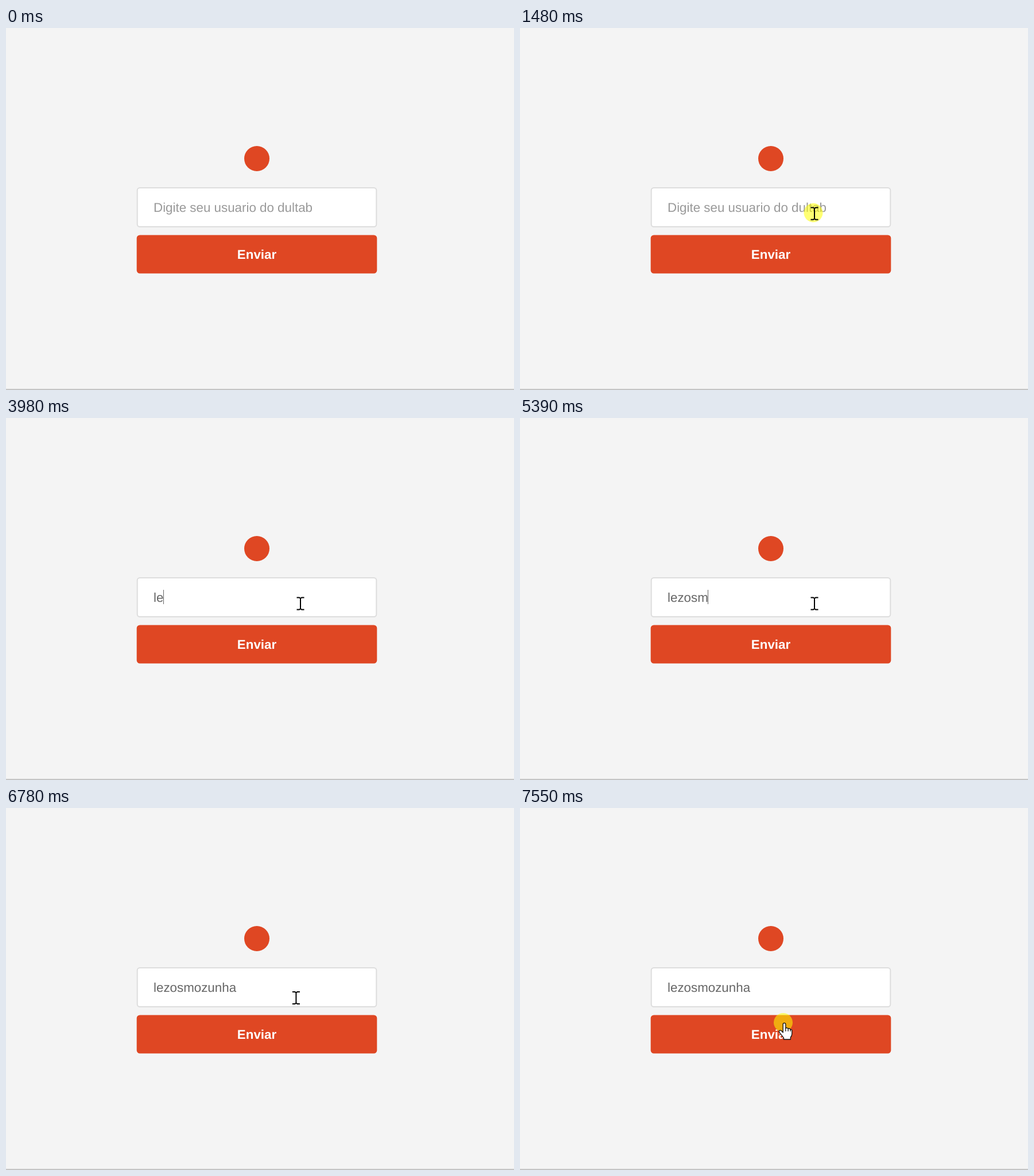
An HTML page for the animation above (8 s loop, 885 px wide and 632 px high).

```html
<!DOCTYPE html>
<html lang="pt">
<head>
<meta charset="utf-8">
<title>Login</title>
<style>
  html, body { margin: 0; width: 100%; height: 100%; overflow: hidden; background: #f4f4f4; }
  svg { display: block; width: 100%; height: 100%; }
  text { font: 22.35px "Liberation Sans", Arial, sans-serif; text-rendering: geometricPrecision; }
  .button-label { font-weight: bold; text-anchor: middle; fill: #fff; }
  .shape { fill: #fff; stroke: #111; stroke-width: 1.3; stroke-linejoin: round; }
</style>
</head>
<body>
<svg viewBox="0 0 885 632">
  <rect width="885" height="632" fill="#f4f4f4"/>
  <rect y="630" width="885" height="2" fill="#c4c4c4"/>
  <circle cx="437" cy="228" r="22" fill="#df4723"/>

  <rect x="228.7" y="279" width="416.6" height="68" rx="4.5" fill="#fff" stroke="#ddd" stroke-width="2"/>
  <text id="placeholder" x="257" y="321" fill="#999">Digite seu usuario do dultab</text>
  <text id="typed" x="257" y="321" fill="#666"></text>
  <rect id="caret" y="300" width="1" height="25" fill="#666"/>

  <rect x="227.7" y="361.5" width="418.6" height="67" rx="5.5" fill="#df4723"/>
  <text class="button-label" x="437" y="403">Enviar</text>

  <g id="pointer">
    <circle id="click" cx="-2" cy="-1.5" r="16.5" fill="#ff0" fill-opacity=".55"/>
    <path id="arrow" class="shape" d="M0 0V23.5L5.5 18.5L9.3 27L13 25.4L9.3 17H17Z"/>
    <path id="beam" fill="none" stroke="#000" stroke-width="2"
      d="M-6.5 -10.5H-2L0 -9L2 -10.5H6.5M0 -9.5V9.5M-6.5 10.5H-2L0 9L2 10.5H6.5"/>
    <g id="hand" class="shape">
      <path d="M-2.3 1.6Q-2.3 -.6 0 -.6Q2.3 -.6 2.3 1.6V8.6Q3 7.5 4.6 7.8Q6.4 8 6.6 9.6
        Q7.2 8.6 8.8 9Q10.4 9.4 10.6 11Q11.3 10.2 12.4 10.8Q13.3 11.3 13.3 13V18
        Q13.3 21.5 10.8 24.5V28H-1V25.5Q-5 20 -8.7 15.6Q-9.8 13.6 -8.2 12.4Q-6 11.6 -4 14L-2.3 16Z"/>
      <path fill="none" d="M2.3 8.5V14M6.6 9.6V14M10.6 11V14"/>
    </g>
  </g>
</svg>
<script>
const LOOP = 8000;
const USER = "lezosmozunha";
const BLINK = 550;
const FRAME = 76;
const ENTER = 480, FIELD_CLICK = 1480, FOCUS = 1840, LEAVE = 6780, BUTTON_CLICK = 7390;
const CLICK_LENGTH = 165;
const FIELD = [513, 324], BUTTON = [460.5, 376];

const $ = id => document.getElementById(id);
const show = (id, visible) => $(id).setAttribute("visibility", visible ? "inherit" : "hidden");
const mix = (from, to, amount) => from + (to - from) * amount;

// Keys come in quick pairs: every second one is half a beat early
const burst = (start, count, beat) =>
  Array.from({ length: count }, (_, i) => start + beat * (i - (i % 2) / 2));
const keyTimes = [...burst(3910, 5, 117), ...burst(5390, 7, 140)];

function pointerAt(t) {
  if (t < ENTER) return null;
  if (t < LEAVE) {
    const left = 1 - Math.min(Math.floor((t - ENTER) / FRAME) / 10, 1);
    return [mix(FIELD[0], 684, left ** 4), mix(FIELD[1], 555, left ** 2.85)];
  }
  const done = Math.min((Math.floor((t - LEAVE) / FRAME) + 1) / 5, 1) ** 1.2;
  return FIELD.map((value, axis) => mix(value, BUTTON[axis], done));
}

function shapeAt(x, y) {
  if (x < 228 || x > 646) return "arrow";
  if (y >= 278 && y <= 348) return "beam";
  return y >= 361 && y <= 428 ? "hand" : "arrow";
}

function drawField(t) {
  const pressed = keyTimes.filter(time => t >= time);
  $("typed").textContent = USER.slice(0, pressed.length);
  show("placeholder", !pressed.length);

  // Each key restarts the caret's blinking
  const sinceInput = t - (pressed.at(-1) ?? FIELD_CLICK);
  const focused = t >= FOCUS && t < BUTTON_CLICK;
  show("caret", focused && Math.floor(sinceInput / BLINK) % 2 === 0);
  const width = pressed.length ? $("typed").getComputedTextLength() : 0;
  $("caret").setAttribute("x", Math.floor(257 + width));
}

function drawPointer(t) {
  const point = pointerAt(t);
  show("pointer", point);
  const shape = point && shapeAt(...point);
  for (const id of ["arrow", "beam", "hand"]) show(id, id === shape);
  show("click", [FIELD_CLICK, BUTTON_CLICK].some(start => t >= start && t < start + CLICK_LENGTH));
  if (point) $("pointer").setAttribute("transform", `translate(${point})`);
}

function tick() {
  const t = performance.now() % LOOP;
  drawField(t);
  drawPointer(t);
  requestAnimationFrame(tick);
}
tick();
</script>
</body>
</html>
```
